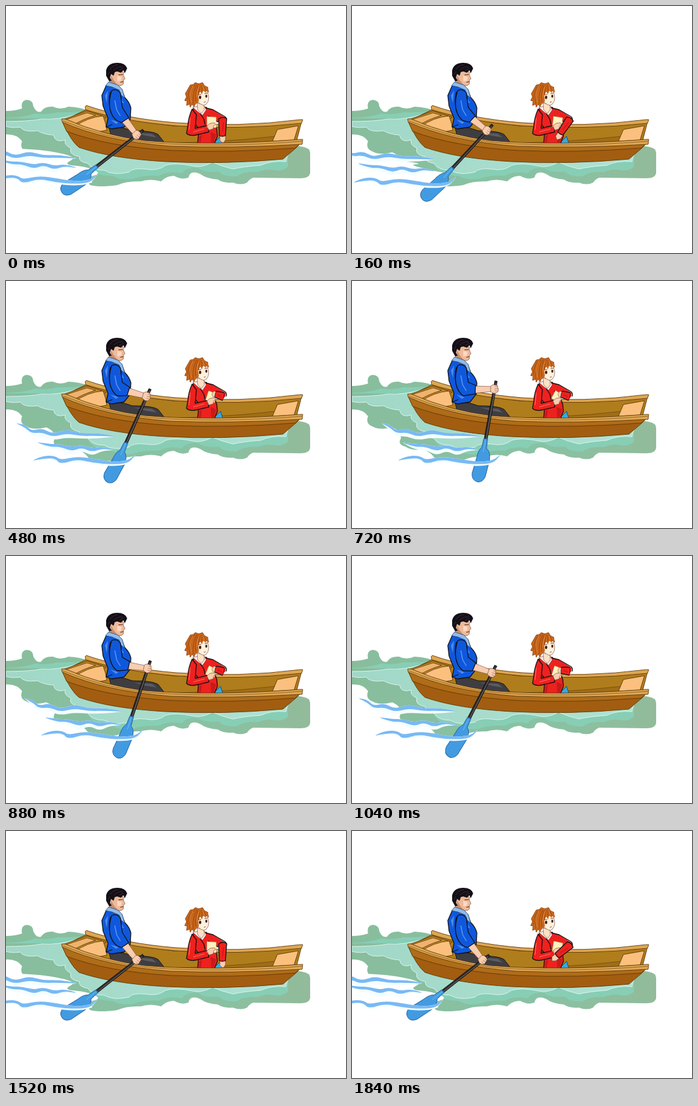
An HTML page that plays this animation: 550 by 400 pixels, repeating every 1.92 s.

```html
<!DOCTYPE html>
<html lang="en">
<head>
<meta charset="utf-8">
<title>Rowing boat</title>
<style>
  html, body { margin: 0; width: 100%; height: 100%; overflow: hidden; background: #fff; }
  svg { display: block; width: 550px; height: 400px; }
  .line { fill: none; }
  .ink { stroke: #111; stroke-width: 1.3; stroke-linejoin: round; }
  .wood { stroke: #5f3906; stroke-width: .9; stroke-linejoin: round; }
  .skin { fill: #f8cdb0; stroke: #6b3a2a; stroke-width: .6; }
</style>
</head>
<body>
<svg viewBox="0 0 550 400">
  <defs>
    <linearGradient id="deep">
      <stop offset="0" stop-color="#88bd9c"/><stop offset=".6" stop-color="#88c2a4"/><stop offset="1" stop-color="#92bb9a"/>
    </linearGradient>
    <linearGradient id="shallow">
      <stop offset="0" stop-color="#a0d7c6"/><stop offset="1" stop-color="#b0e2d3"/>
    </linearGradient>
  </defs>

  <g id="water">
    <path fill="url(#deep)" d="M0 170Q14 170 26 166Q23 153 34 152Q44 153 44 162Q49 174 57 171Q62 162 76 163Q88 169 101 163Q120 164 132 169L480 228Q492 230 492 238V270Q491 279 476 279L400 278Q394 280 390 286Q380 291 367 286Q350 287 343 281Q325 280 314 272Q298 265 295 278Q284 282 272 275Q260 275 251 284Q233 279 218 284Q195 283 180 290Q152 294 136 290Q129 278 115 272Q98 276 86 268Q73 265 79 255Q80 243 65 237Q45 242 34 236Q21 231 26 219Q18 207 0 208Z"/>
    <path fill="#87ceb5" d="M0 181Q28 181 47 174Q67 177 84 172Q107 173 132 169V182H0ZM120 236L456 232V260Q449 268 435 266Q421 263 407 269Q385 267 373 276Q352 277 344 268Q321 271 310 262Q291 261 284 271Q264 266 247 275Q221 274 205 280Q185 283 172 275Q148 276 136 262Z"/>
    <path fill="url(#shallow)" stroke="#dcf4ed" stroke-width="1" d="M0 187Q36 187 58 183Q84 185 116 175L140 200L460 235Q453 245 453 252Q429 250 412 258Q384 260 367 264Q350 260 334 253Q315 263 302 259Q274 253 258 258Q246 268 225 264Q204 262 199 269Q174 275 159 266Q140 266 133 255Q116 252 119 244Q101 241 105 230Q93 225 96 217Q79 222 77 209Q61 208 51 202Q29 205 23 196Q10 198 0 195Z"/>
  </g>

  <g id="boat-back" class="wood">
    <path fill="#b07d1c" d="M129 168Q190 185 270 194Q385 200 478 188L470 219L330 228Q190 228 92 186Z"/>
    <path fill="#a06e16" stroke-width=".6" d="M215 222Q335 223 436 211L430 221Q330 229 215 225Z"/>
    <path fill="#c18a2c" d="M92 184L131 170L162 180L125 206Z"/>
    <path fill="#fbc07e" d="M110 196Q132 180 157 178L161 190L163 201L133 207Z"/>
    <path fill="#efb36d" d="M97 184L131 173L145 177Q122 184 107 194Z"/>
    <path fill="#fbc07e" d="M439 200L473 194L466 217L431 219Z"/>
    <path fill="#dea653" d="M128 163L130 161Q190 182 275 189Q375 197 476 184L480 184L478 190Q374 201 274 194Q187 186 129 168Z"/>
  </g>

  <g id="man">
    <path fill="#3e3d42" stroke="#171717" d="M167 198Q184 194 204 202Q238 202 246 208L257 222L205 220L171 214Z"/>
    <path fill="#5c5b61" d="M207 205L236 207L244 213L226 210Z"/>
    <path class="skin" style="fill: #eeba98" d="M168 108Q180 102 190 107L190 112L192.500 118L190 120L190 126Q187 130 182 129L183 137L167 128Z"/>
    <path fill="#c98d6d" d="M170 112L174 120L179 126L182 130L180 134L169 127Z"/>
    <path fill="#fbd8c2" d="M180 113L187 115L186 121L180 122Z"/>
    <path d="M182 111.500L189 111M185 123.500L190 122.500" stroke="#49231d" stroke-width="1.2"/>
    <path fill="#130f17" d="M167 122L162 113L162 104Q165 92 180 92Q193 92 196 101L192 109L190 104L186 108L180 106L176 107L174 113L170 110L168 116L171 121Z"/>
    <path class="line" stroke="#55333a" stroke-width=".7" d="M168 103Q174 95 181 95M174 104Q181 97 189 99M165 111L168 106M183 104L190 101"/>
    <path class="ink" fill="#0f58dc" d="M162 129L172 127L187 135L192 148Q200 156 202 165L201 183L191 196L171 199L162 196L165 182L157 162L155 145Z"/>
    <path fill="#91bce9" stroke="#25446f" stroke-width=".8" d="M161 129L166 123L181 128L188 135L192 149L186 144L183 136L171 131Z"/>
    <path fill="#4a8bee" d="M160 145L165 137L163 157ZM185 148L191 157L188 157ZM169 184L182 188L178 191Z"/>
    <path class="line ink" d="M169 139Q165 153 169 168L174 178M162 196L172 192M186 146L187 164"/>
  </g>

  <g id="woman">
    <path fill="#38a8df" stroke="#134c70" d="M336 222L347 211L351 223Z"/>
    <path class="ink" fill="#ee211f" d="M303 166L324 164L333 177L341 200L342 211L337 223H310L312 199L301 185Z"/>
    <path fill="#c81a19" d="M331 204L340 208L336 221L332 222ZM313 211L317 208L315 222H312Z"/>
    <path fill="#fff3ed" stroke="#83352f" stroke-width=".7" d="M302 164L320 161L324 168L318 177L310 171Z"/>
    <path class="skin" style="fill: #fde0c4" d="M309 157L320 160L321 168L316 174L310 168Z"/>
    <path class="line ink" d="M314 174L320 183L322 192"/>
    <path class="ink" fill="#ee211f" d="M301 167Q295 180 294 195L292 206Q296 211 307 209L328 204L327 193L306 198L308 176Z"/>
    <path class="line" stroke="#fa786c" d="M298 181L296 201M303 204L321 199"/>
    <path fill="#c9661a" stroke="#803a0c" stroke-width=".8" stroke-linejoin="round" d="M298 164L297 159L292 161L293 154L289 153L292 147L290 142L294 135L298 128L303 127L306 124L312 126L318 124L321 129L327 132L325 134L328 139L320 140L312 155L307 158L304 163L301 159Z"/>
    <path fill="#fff0dc" stroke="#6b3a2a" stroke-width=".6" d="M309 142Q319 134 326 138L328 148Q328 155 324 159Q321 162 317 160Q311 158 309 152Z"/>
    <path fill="#c9661a" d="M304 128L321 129L327 133L328 139L323 136L324 141L319 137L317 143L314 138L311 146L312 154L307 158Z"/>
    <path class="line" stroke="#8b3d0c" stroke-width=".8" d="M306 127Q297 136 297 158M309 127Q301 140 303 159M311 128Q305 140 307 155M314 128L311 144M317 128L317 139M320 130L324 138M300 130Q294 139 294 152"/>
    <path class="line" stroke="#ea9548" stroke-width=".8" d="M303 130Q295 143 300 156M313 129Q308 138 309 147M318 129L321 136"/>
    <ellipse cx="314" cy="148" rx="1.9" ry="2.800" fill="#382018"/>
    <ellipse cx="324" cy="146" rx="1.600" ry="2.600" fill="#382018"/>
    <path class="line" stroke="#71362a" stroke-width=".8" d="M311 144L316 143M321 142L326 141M320 156L323 155"/>
    <path fill="#ee211f" d="M323 165L335 168L355 181Q357 188 349 191L327 180Z"/>
    <path class="line ink" d="M323 165L335 168L354 179Q358 182 356 187M327 178L343 188"/>
    <path id="note" fill="#fff2bd" stroke="#b7a566" stroke-width=".6" d="M-7-9L8-8L8 9L-7 9Z"/>
    <path class="skin" d="M325 194L330 190L337 189L339 192L336 194L335 199L328 201Z"/>
    <g id="forearm">
      <path class="skin" d="M-4 23L5 23L5 31L1 36L-4 32Z"/>
      <path class="ink" fill="#ee211f" d="M-6-3Q0-8 7-4L5 24Q0 26-5 24Z"/>
      <path class="line" stroke="#b91518" d="M2 2L0 17"/>
    </g>
  </g>

  <g id="boat-front" class="wood">
    <path fill="#a25d11" d="M91 187Q170 220 270 226Q380 230 477 222L469 230L448 248Q350 257 258 252Q170 247 118 229Q105 219 91 187Z"/>
    <path fill="#b06c18" d="M91 187Q170 220 270 226Q380 230 477 222L468 230Q365 238 268 234Q165 228 98 203Z"/>
    <path fill="#dea653" d="M90 183L96 183Q158 210 225 218Q330 227 476 216L480 216L479 224Q360 231 265 227Q160 219 91 188Z"/>
    <path class="line" stroke-width=".6" d="M92 186Q160 214 230 221Q340 230 479 219"/>
  </g>

  <g id="foam-back"></g>
  <g id="oar">
    <path fill="#2d2b2d" stroke="#000" stroke-width=".7" d="M-2 0H2L2.500 102H-2.500Z"/>
    <path class="line" stroke="#85817d" stroke-width=".8" d="M.8 3V98"/>
    <path fill="#429be1" stroke="#245f9f" stroke-width=".9" d="M-3 95H3L4 110Q12 115 12 129L10 156Q7 166-1 166Q-11 165-12 154L-9 127Q-9 115-4 110Z"/>
    <path class="line" stroke="#6fbcf0" d="M0 97V117"/>
  </g>
  <g id="foam-front"></g>
  <path id="arm" class="skin"/>
  <path id="cuff" class="ink" fill="#0f58dc"/>
  <path class="line" stroke="#5c9cf0" stroke-width="1.4" d="M176 153L179 168L185 178"/>
  <g id="hand">
    <path class="skin" d="M-6-5Q-2-9 5-5L6 3Q4 8-2 7L-7 4Z"/>
    <path class="line" stroke="#8d5942" stroke-width=".6" d="M1-4L5-3M0 0L6 0M0 3L5 4"/>
  </g>
</svg>

<script>
const LOOP = 1920, STEP = 80;
const $ = id => document.getElementById(id);
const mix = (a, b, k) => a + (b - a) * k;
const clamp = v => Math.max(0, Math.min(1, v));
const place = (id, x, y, angle = 0, tail = '') =>
  $(id).setAttribute('transform', `translate(${x} ${y}) rotate(${angle}) ${tail}`);

// Closed outline through the midpoints of a loop of points.
function smooth(points) {
  const mid = (a, b) => `${(a[0] + b[0]) / 2} ${(a[1] + b[1]) / 2}`;
  const n = points.length;
  return 'M' + mid(points[n - 1], points[0]) +
    points.map((p, i) => `Q${p} ${mid(p, points[(i + 1) % n])}`).join('') + 'Z';
}

// Band of uneven thickness along a line, tapering at both ends.
function ribbon(line, thick, below = 0) {
  const last = line.length - 1;
  const lower = line.map(([x, y], i) => {
    const body = Math.sqrt(Math.sin(Math.PI * i / last));
    return [x, y + 1 + body * (thick + below * (i % 2 ? 1 : .4))];
  });
  return smooth([...line, ...lower.reverse()]);
}

const crests = [
  [[48, 230], [62, 233], [72, 243], [89, 238], [106, 248], [129, 240], [152, 247], [178, 246], [207, 251]],
  [[82, 261], [103, 264], [118, 264], [137, 269], [153, 265], [170, 271], [186, 268], [205, 273]],
  [[75, 290], [91, 283], [110, 283], [119, 290], [145, 284], [174, 288], [202, 293], [228, 291], [240, 281]]
];

function addPath(parent, fill) {
  const path = document.createElementNS('http://www.w3.org/2000/svg', 'path');
  path.setAttribute('fill', fill);
  $(parent).append(path);
  return path;
}
const spread = addPath('foam-back', '#fff');
const bands = crests.map((_, i) => {
  const parent = i === 2 ? 'foam-front' : 'foam-back';
  return { foam: addPath(parent, '#f4fdff'), edge: addPath(parent, '#79b9f3') };
});

function drawFoam(reach) {
  const calm = clamp(1 - reach / .4);
  const dx = -92 * (1 - reach), dy = -5 * clamp((.6 - reach) / .6);
  const lift = [0, -7, -4];
  bands.forEach(({ foam, edge }, i) => {
    const line = crests[i].map(([x, y]) => [x + dx, y + dy + lift[i] * calm]);
    foam.setAttribute('d', ribbon(line, 6, i === 2 ? 3 : 7));
    edge.setAttribute('d', ribbon(line, 2, 4));
  });
  // The wash widens as the blade reaches the stern.
  spread.setAttribute('d', calm > 0 ? smooth([
    [-40, 231], [30, mix(260, 231, calm)], [74, mix(262, 235, calm)],
    [115, mix(264, 245, calm)], [92, 257], [130, mix(272, 260, calm)],
    [155, 271], [130, 278], [145, 287], [105, 289], [70, 292], [30, 288], [-40, 293]
  ]) : '');
}

function drawRower(reach) {
  const angle = 52 - 41.9 * reach, rad = angle * Math.PI / 180;
  const x = 222 + 27.6 * reach - 16.6 * reach * reach, y = 201 - 39 * reach;
  const hx = x - 13 * Math.sin(rad), hy = y + 13 * Math.cos(rad);
  place('oar', x, y, angle);
  place('hand', hx, hy, mix(38, -4, reach));

  const ex = mix(188, 192, reach), ey = mix(179, 176, reach);
  const len = Math.hypot(hx - ex, hy - ey);
  const ux = (hx - ex) / len, uy = (hy - ey) / len;
  const at = (along, side) => `${ex + ux * along - uy * side} ${ey + uy * along + ux * side}`;
  $('arm').setAttribute('d',
    `M${at(2, -6)}L${at(len - 4, -4)}L${at(len - 3, 4)}L${at(4, 6)}Z`);
  $('cuff').setAttribute('d',
    `M171 137Q166 151 168 166Q171 180 180 186L${at(7, 7)}L${at(8, -7)}L188 164L185 141Q179 133 171 137Z`);
}

function drawPassenger(reach) {
  const turn = reach < .45 ? mix(0, 66, reach / .45) : mix(66, 104, clamp((reach - .45) / .2));
  const fold = clamp((reach - .45) / .15);
  place('forearm', 350, 186, turn, `scale(1 ${mix(1, .48, fold)})`);
  place('note', 332, mix(188, 187, reach), mix(0, 28, reach), `scale(1 ${mix(1, .8, reach)})`);
}

function render(time) {
  const t = Math.floor(time % LOOP / STEP) * STEP;
  const reach = t <= 720 ? t / 720 : clamp((1520 - t) / 800);
  drawRower(reach);
  drawFoam(reach);
  drawPassenger(t > 1600 ? (t - 1600) / 720 : reach);
}

const start = performance.now();
function tick(now) {
  render(Math.max(0, now - start));
  requestAnimationFrame(tick);
}
render(0);
requestAnimationFrame(tick);
</script>
</body>
</html>
```
